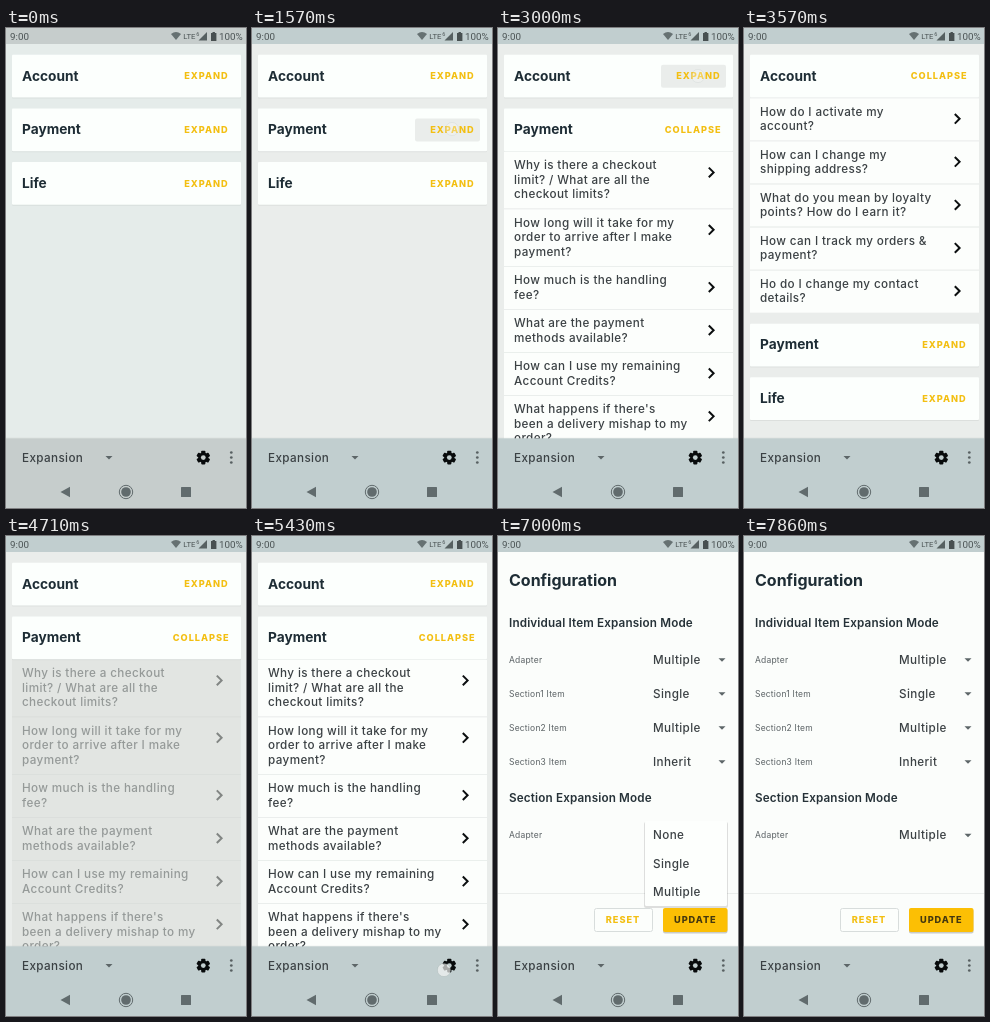
Animation of 240x480 px, one loop 8000 ms. Source, as an HTML page:

```html
<!DOCTYPE html>
<html lang="en">
<head>
<meta charset="utf-8">
<title>Expandable sections</title>
<style>
html, body { margin: 0; width: 100%; height: 100%; overflow: hidden; }
svg { display: block; width: 100%; height: 100%; }
text { font: 500 11.7px Inter, sans-serif; letter-spacing: .37px; fill: #3b4144; white-space: pre; }
.title { font-size: 13.7px; font-weight: 700; letter-spacing: 0; fill: #1e2d35; }
.head { font-weight: 600; letter-spacing: .15px; fill: #263238; }
.label { font-size: 8.5px; font-weight: 400; letter-spacing: .2px; fill: #5b6265; }
.btn { font-size: 9.2px; font-weight: 800; letter-spacing: .95px; fill: #f3bf12; }
.status { font: 400 9.8px Roboto, sans-serif; letter-spacing: 0; fill: #4b5354; }
.small { font-size: 7.7px; }
</style>
</head>
<body>
<svg id="stage" viewBox="0 0 240 480"></svg>
<script>
const LOOP = 8000, FPS = 7;
const LINE = 14.35, HEADER = 42.8, GAP = 10.8, TOP = 26.8;

const sections = [
  { name: 'Account', items: [
    'How do I activate my|account?',
    'How can I change my|shipping address?',
    'What do you mean by loyalty|points? How do I earn it?',
    'How can I track my orders &amp;|payment?',
    'Ho do I change my contact|details?'] },
  { name: 'Payment', items: [
    'Why is there a checkout|limit? / What are all the|checkout limits?',
    'How long will it take for my|order to arrive after I make|payment?',
    'How much is the handling|fee?',
    'What are the payment|methods available?',
    'How can I use my remaining|Account Credits?',
    "What happens if there's|been a delivery mishap to my|order?"] },
  { name: 'Life', items: [] }
];

const step = n => n * 1000 / FPS;
const toggles = [
  { at: step(10), from: -1, to: 1 },
  { at: step(20), from: 1, to: 0 },
  { at: step(29), from: 0, to: 1 }
];
const OPEN_SHEET = step(38), OPEN_MENU = step(45), PICK = step(52);
const taps = [
  [toggles[0].at, 200, 101], [toggles[1].at, 200, 48], [toggles[2].at, 200, 317],
  [OPEN_SHEET, 192, 434], [OPEN_MENU, 172, 298], [PICK, 174, 356]
];

const text = (x, y, s, cls = '', more = '') => `<text x="${x}" y="${y}" class="${cls}" ${more}>${s}</text>`;
const rect = (x, y, w, h, fill, more = '') =>
  `<rect x="${x}" y="${y}" width="${w}" height="${h}" fill="${fill}" ${more}/>`;
const circle = (x, y, r, fill, more = '') => `<circle cx="${x}" cy="${y}" r="${r}" fill="${fill}" ${more}/>`;
const path = (d, fill, more = '') => `<path d="${d}" fill="${fill}" ${more}/>`;
const arrow = (x, y) => path(`M${x - 3.5} ${y - 1.3}h7l-3.5 3.5z`, '#5d6668');

function itemRows(items) {
  let y = HEADER, out = '';
  for (const item of items) {
    const lines = item.split('|'), h = LINE * (lines.length + 1);
    out += rect(6, y, 229, h, '#fcfefc') + rect(6, y, 229, .8, '#e8ecea');
    lines.forEach((s, i) => out += text(16, y + LINE * (i + 1) + 3.9, s));
    out += path(`M210.8 ${y + 16.4}l4.8 4.8l-4.8 4.8`, 'none', 'stroke="#0c0f10" stroke-width="2"');
    y += h;
  }
  return { out, height: y - HEADER };
}

function sectionMarkup(s, i) {
  const rows = itemRows(s.items);
  s.height = rows.height;
  return `<g id="sec${i}">
    ${rect(6, 1, 229, HEADER, '#000', 'opacity=".06" rx="1"')}
    ${rect(6, HEADER, 229, s.height, '#0c1400', `id="under${i}"`)}
    <g id="items${i}">${rows.out}</g>
    ${rect(6, 0, 229, HEADER, '#fcfffd', 'rx="1"')}
    ${rect(163, 10, 65, 23, '#000', `id="press${i}" rx="2"`)}
    ${text(16, 25.8, s.name, 'title')}
    ${text(178.3, 24.6, 'EXPAND', 'btn', `id="exp${i}"`)}
    ${text(166.8, 24.6, 'COLLAPSE', 'btn', `id="col${i}"`)}
  </g>`;
}

const option = (y, label, value, id = '') =>
  text(11, y + 3.1, label, 'label') + text(155, y + 4.2, value, '', id) + arrow(224, y);

const sheet = `<g id="sheet">
  ${rect(0, 16, 240, 400, '#fbfdfb')}
  ${text(11, 49.6, 'Configuration', 'title', 'style="font-size:16px"')}
  ${text(11, 90.5, 'Individual Item Expansion Mode', 'head')}
  ${option(123.5, 'Adapter', 'Multiple')}
  ${option(157.5, 'Section1 Item', 'Single')}
  ${option(191.5, 'Section2 Item', 'Multiple')}
  ${option(225.5, 'Section3 Item', 'Inherit')}
  ${text(11, 266, 'Section Expansion Mode', 'head')}
  ${circle(221.5, 299, 9.3, '#dfe3e2', 'id="ripple"')}
  ${option(299, 'Adapter', 'Single', 'id="mode"')}
  ${rect(0, 357, 240, .8, '#e6eae8')}
  ${rect(96.5, 372.5, 58, 23, '#fcfefc', 'rx="2" stroke="#d8dddc"')}
  ${text(107.8, 387.3, 'RESET', 'btn')}
  ${rect(165, 373, 64.5, 24.5, '#000', 'rx="2" opacity=".2"')}
  ${rect(165, 372, 64.5, 24, '#fcbf04', 'rx="2"')}
  ${text(176, 387.3, 'UPDATE', 'btn', 'style="fill:#44380f"')}
</g>`;

const menu = `<g id="menu">
  ${rect(146, 286, 84, 86, '#000', 'opacity=".12" rx="2"')}
  ${rect(147, 285, 82, 85, '#fdfffd', 'rx="1.5"')}
  ${rect(147, 342, 82, 28, '#e2e6e4', 'id="picked"')}
  ${['None', 'Single', 'Multiple'].map((s, i) => text(155, 303.2 + i * 28.3, s)).join('')}
</g>`;

const gear = [0, 60, 120].map(a =>
  rect(195.2, 422.8, 4.2, 13.6, '#080b0c', `rx=".8" transform="rotate(${a} 197.3 429.6)"`)).join('') +
  circle(197.3, 429.6, 3.7, 'none', 'stroke="#080b0c" stroke-width="2.8"') +
  circle(197.3, 429.6, 2.4, 'currentColor');

const bars = `<g id="bars" fill="currentColor">
  ${rect(0, 0, 240, 16, 'currentColor')}
  ${rect(0, 409.5, 240, 1, '#000', 'opacity=".04"')}
  ${rect(0, 410.3, 240, 69.7, 'currentColor')}
  ${text(4, 11.6, '9:00', 'status')}
  ${path('M165 6Q170 2 175 6L170 12z', '#667172')}
  ${text(177.3, 11, 'LTE', 'status small')}
  ${text(190.3, 8.2, '6', 'status', 'style="font-size:5.5px"')}
  ${path('M201 4v8.5h-8.5z', '#566061')}
  ${path('M205 5h1.5v-1h2.4v1h1.5v8h-5.4z', '#485051')}
  ${text(213, 11.6, '100%', 'status')}
  ${text(16, 433.5, 'Expansion')}
  ${arrow(103, 429.3)}
  ${gear}
  ${[424.5, 429.5, 434.5].map(y => circle(225.3, y, 1.35, '#586062')).join('')}
  ${path('M64 458.7v10.6l-9.5-5.3z', '#616b6d')}
  ${circle(120, 464, 4.8, '#616b6d')}
  ${circle(120, 464, 6.7, 'none', 'stroke="#616b6d" stroke-width="1"')}
  ${rect(175, 459, 10, 10, '#616b6d', 'rx=".5"')}
</g>`;

const stage = document.getElementById('stage');
stage.innerHTML = rect(0, 0, 240, 480, '#eaedeb', 'id="page"') +
  sections.map(sectionMarkup).join('') + sheet + menu + bars +
  circle(0, 0, 6.6, '#f4f6f5', 'id="dot" fill-opacity=".68" stroke="#7c8a8a" stroke-opacity=".2"');

const el = {};
stage.querySelectorAll('[id]').forEach(n => el[n.id] = n);

const ramp = (t, a, b) => Math.min(1, Math.max(0, (t - a) / (b - a)));
const smooth = p => (1 - Math.cos(Math.PI * p)) / 2;
const fade = (id, o) => el[id].setAttribute('opacity', o.toFixed(3));
const shift = (id, x, y) => el[id].setAttribute('transform', `translate(${x} ${y.toFixed(2)})`);

function layout(open) {
  let y = TOP;
  return sections.map((s, i) => {
    const at = y;
    y += HEADER + GAP + (i === open ? s.height : 0);
    return at;
  });
}

function drawList(t) {
  const tog = toggles.filter(g => t >= g.at).pop() || { at: Infinity, from: -1, to: -1 };
  const dt = t - tog.at, lead = tog.from < 0 ? 0 : 80;
  const gone = ramp(dt, 190, 310);
  const move = smooth(ramp(dt, 190 + lead, 430 + lead));
  const shown = ramp(dt, 420 + lead, 600 + lead);
  const before = layout(tog.from), after = layout(tog.to);
  sections.forEach((s, i) => {
    const p = tog.to === tog.from ? 0 : i === tog.to ? shown : i === tog.from ? 1 - gone : 0;
    const label = i === tog.to ? move : i === tog.from ? 1 - move : 0;
    shift('sec' + i, 0, before[i] + (after[i] - before[i]) * move);
    fade('items' + i, p);
    fade('under' + i, Math.min(p * .3, .11));
    fade('exp' + i, 1 - label);
    fade('col' + i, label);
    fade('press' + i, i === tog.to && dt > 100 ? .07 * (1 - ramp(dt, 200, 500)) : 0);
  });
}

function drawSheet(t) {
  const p = ramp(t, OPEN_SHEET + 90, OPEN_SHEET + 520);
  shift('sheet', 0, 394 * (1 - p) ** 2.2);
  el.sheet.setAttribute('visibility', p > 0 ? 'visible' : 'hidden');

  const open = ramp(t, OPEN_MENU + 90, OPEN_MENU + 400), close = ramp(t, PICK + 190, PICK + 380);
  fade('menu', open * (1 - close));
  el.menu.style.clipPath = `inset(0 0 ${(66 * (1 - smooth(open))).toFixed(1)}% 0)`;
  fade('picked', ramp(t, PICK + 50, PICK + 130));
  fade('ripple', t >= OPEN_MENU ? 1 - ramp(t, OPEN_MENU + 150, OPEN_MENU + 450) : 0);
  el.mode.textContent = t >= PICK + 200 ? 'Multiple' : 'Single';
}

function drawDot(t) {
  const tap = taps.find(([at]) => t >= at && t < at + 200);
  fade('dot', tap ? 1 - ramp(t, tap[0] + 80, tap[0] + 200) : 0);
  if (tap) shift('dot', tap[1], tap[2]);
}

function draw(ms) {
  // The screen refreshes seven times a second.
  const t = step(Math.floor((ms + 5) * FPS / 1000)) + .01;
  const dull = t < toggles[0].at;
  el.page.setAttribute('fill', dull ? '#e5ecea' : '#eaedeb');
  el.bars.style.color = dull ? '#c6cdcc' : '#c1cecf';
  drawList(t);
  drawSheet(t);
  drawDot(t);
}

const start = performance.now();
function tick() {
  draw((performance.now() - start) % LOOP);
  requestAnimationFrame(tick);
}
tick();
</script>
</body>
</html>
```
